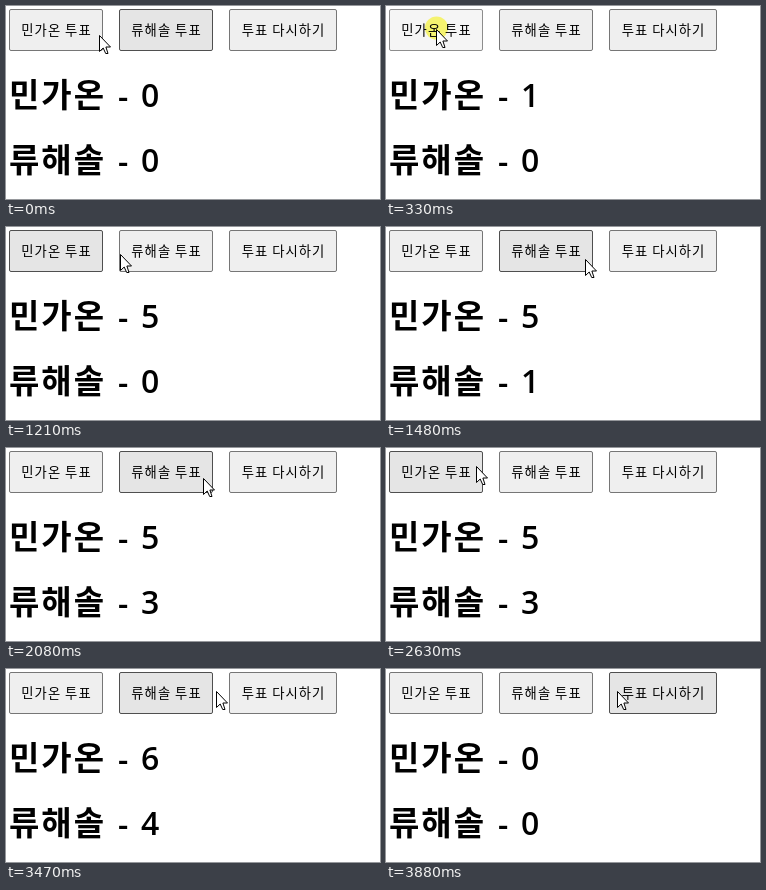
An HTML page with a canvas that plays this animation: 374 px wide and 193 px high, repeating every 3.95 s.

```html
<!DOCTYPE html>
<html lang="ko">
<head>
<meta charset="utf-8">
<style>
html, body { margin: 0; width: 100%; height: 100%; overflow: hidden; background: #fff; }
canvas { display: block; }
</style>
</head>
<body>
<canvas id="stage" width="374" height="193"></canvas>
<script>
const ctx = document.getElementById('stage').getContext('2d');
const LOOP = 3950;
const TICK = LOOP / 59;
const HOLD = 110;
const HANGUL = '"Noto Sans CJK KR", "Noto Sans CJK", sans-serif';
const LATIN = '"Open Sans", "Noto Sans", sans-serif';

const names = ['민가온', '류해솔'];
const labels = [...names.map(name => name + ' 투표'), '투표 다시하기'];
const buttons = labels.map((label, i) => ({ label, x: 3 + 110 * i, w: i < 2 ? 94 : 108 }));

// places where the pointer rests
const stops = [
  { x: 120, y: 33, arrive: -80, leave: -80 },
  { x: 50, y: 23, arrive: 130, leave: 1050 },
  { x: 199, y: 32, arrive: 1410, leave: 1610 },
  { x: 197, y: 30, arrive: 1740, leave: 2080 },
  { x: 217, y: 30, arrive: 2280, leave: 2280 },
  { x: 90, y: 18, arrive: 2540, leave: 2850 },
  { x: 166, y: 22, arrive: 3010, leave: 3300 },
  { x: 231, y: 22, arrive: 3470, leave: LOOP }
];

const burst = (from, every = 0, count = 1) => Array.from({ length: count }, (_, i) => from + every * i);
const presses = [...burst(130, 200, 5), ...burst(1340, 300, 3), ...burst(2770), ...burst(3120), ...burst(3610)];

function pointerAt(t) {
  const i = Math.max(1, stops.findIndex(s => s.leave >= t));
  const a = stops[i - 1], b = stops[i];
  const k = Math.min(1, (t - a.leave) / (b.arrive - a.leave));
  return { x: Math.round(a.x + (b.x - a.x) * k), y: Math.round(a.y + (b.y - a.y) * k) };
}

function buttonAt(t) {
  const { x } = pointerAt(t);
  return buttons.findIndex(b => x >= b.x && x < b.x + b.w);
}

// a vote lands when the button is let go
function votesAt(t) {
  const votes = [0, 0];
  for (const down of presses.filter(p => p + HOLD <= t)) {
    const target = buttonAt(down);
    if (target === 2) votes.fill(0);
    else votes[target]++;
  }
  return votes;
}

function text(str, x, y, font, spacing = 0) {
  ctx.font = font;
  ctx.letterSpacing = spacing + 'px';
  ctx.fillStyle = '#000';
  ctx.fillText(str, x, y);
}

function drawButton({ x, w, label }, hover, active) {
  ctx.beginPath();
  ctx.roundRect(x + 0.5, 3.5, w - 1, 41, 1.5);
  ctx.fillStyle = active ? '#f5f5f5' : hover ? '#e5e5e5' : '#efefef';
  ctx.strokeStyle = active ? '#8d8d8d' : hover ? '#4f4f4f' : '#767676';
  ctx.lineWidth = 1;
  ctx.fill();
  ctx.stroke();
  ctx.textAlign = 'center';
  text(label, x + w / 2 + 0.5, 29, '300 13.33px ' + HANGUL, 1);
}

function drawScore(name, votes, baseline) {
  const font = '600 32px ' + LATIN;
  ctx.textAlign = 'left';
  text(name, 3, baseline, 'bold 33px ' + HANGUL, 2);
  text('-', 112, baseline + 1, font);
  text(votes, 135, baseline, font);
}

function drawPointer({ x, y }, pressed) {
  if (pressed) {
    ctx.globalCompositeOperation = 'multiply';
    ctx.fillStyle = '#fffd74';
    ctx.beginPath();
    ctx.arc(x + 0.5, y - 1, 11.5, 0, Math.PI * 2);
    ctx.fill();
    ctx.globalCompositeOperation = 'source-over';
  }
  ctx.save();
  ctx.translate(x + 0.5, y + 0.5);
  const arrow = new Path2D('M0 0V16L3.7 12.5L6.2 18H8.5L6.4 11.5H11Z');
  ctx.fillStyle = '#fff';
  ctx.strokeStyle = '#000';
  ctx.lineWidth = 1;
  ctx.fill(arrow);
  ctx.stroke(arrow);
  ctx.restore();
}

function draw(t) {
  ctx.fillStyle = '#fff';
  ctx.fillRect(0, 0, 374, 193);
  const sampled = Math.floor((t + 10) / TICK) * TICK;
  const pressed = presses.some(p => t >= p && t < p + HOLD);
  const hover = buttonAt(sampled - TICK);
  buttons.forEach((b, i) => drawButton(b, i === hover, pressed && i === hover));
  votesAt(t).forEach((v, i) => drawScore(names[i], v, 101 + 65 * i));
  drawPointer(pointerAt(Math.min(sampled, LOOP)), pressed);
}

const start = performance.now();
function frame() {
  draw((performance.now() - start) % LOOP);
  requestAnimationFrame(frame);
}
frame();
</script>
</body>
</html>
```
